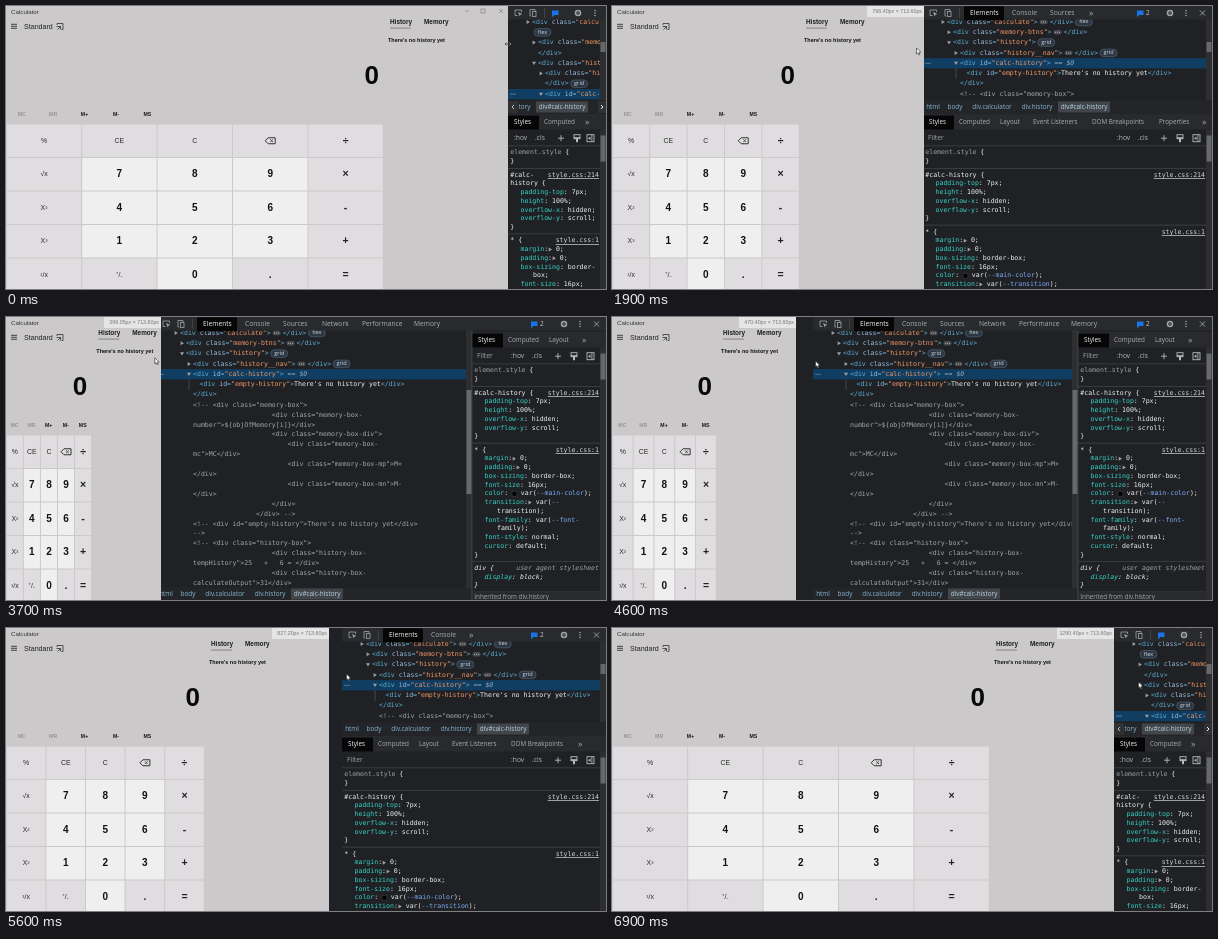
An HTML page with a canvas for the animation above (7000 ms loop, 600 by 283 pixels).

```html
<!DOCTYPE html>
<html lang="en">
<head>
<meta charset="utf-8">
<style>
html, body { margin: 0; width: 600px; height: 283px; overflow: hidden; background: #202124; }
canvas { display: block; width: 600px; height: 283px; }
</style>
</head>
<body>
<canvas id="stage"></canvas>
<script>
const canvas = document.getElementById('stage');
const ctx = canvas.getContext('2d');
const ratio = window.devicePixelRatio || 1;
const WIDTH = 600, HEIGHT = 283, LOOP = 7000, STEP = 100;
canvas.width = WIDTH * ratio;
canvas.height = HEIGHT * ratio;

const ARIAL = '"Liberation Sans", Arial, sans-serif';
const UI = '"Open Sans", "Noto Sans", sans-serif';
const MONO = '6.55px "DejaVu Sans Mono", monospace';

// Motion: [ms, value] pairs
const dividerKeys = [[0, 502], [400, 502], [700, 465], [1100, 413], [1200, 400], [1800, 312], [1900, 311],
  [2800, 201], [2900, 201], [3400, 165], [3800, 145], [4100, 146], [4500, 184], [4600, 201],
  [5500, 323], [5600, 336], [6700, 502]];
const pointerOffset = [[0, -1], [1200, -2], [1900, -5], [2900, -3], [4600, 4], [5600, 6], [6600, 6], [6900, 26]];
const pointerY = [[0, 38], [1200, 46], [1900, 45], [2900, 41], [4600, 47], [5600, 49], [6900, 57]];
const viewportSize = [[140, 357.6], [184, 470.4], [201, 515.2], [312, 796.4], [323, 827.2], [413, 1053.4], [502, 1290.4]];

function interpolate(keys, at) {
  if (at <= keys[0][0]) return keys[0][1];
  for (let i = 1; i < keys.length; i++) {
    const [a, from] = keys[i - 1], [b, to] = keys[i];
    if (at <= b) return from + (to - from) * (at - a) / (b - a);
  }
  return keys[keys.length - 1][1];
}

function rect(x, y, w, h, color) {
  ctx.fillStyle = color;
  ctx.fillRect(x, y, w, h);
}

function text(str, x, y, font, color, align = 'left') {
  ctx.font = font;
  ctx.fillStyle = color;
  ctx.textAlign = align;
  ctx.fillText(str, x, y);
  return ctx.measureText(str).width;
}

function trace(points, closed) {
  ctx.beginPath();
  points.forEach(([x, y]) => ctx.lineTo(x, y));
  if (closed) ctx.closePath();
}

function path(points, color, width = 0.7, closed = false) {
  trace(points, closed);
  ctx.strokeStyle = color;
  ctx.lineWidth = width;
  ctx.stroke();
}

function polygon(points, color) {
  trace(points, true);
  ctx.fillStyle = color;
  ctx.fill();
}

function box(x, y, w, h, color, width) {
  ctx.strokeStyle = color;
  ctx.lineWidth = width;
  ctx.strokeRect(x, y, w, h);
}

function circle(x, y, r, color, width) {
  ctx.beginPath();
  ctx.arc(x, y, r, 0, Math.PI * 2);
  if (width) {
    ctx.strokeStyle = color;
    ctx.lineWidth = width;
    ctx.stroke();
  } else {
    ctx.fillStyle = color;
    ctx.fill();
  }
}

function clipped(x, y, w, h, draw) {
  ctx.save();
  ctx.beginPath();
  ctx.rect(x, y, w, h);
  ctx.clip();
  draw();
  ctx.restore();
}

function triangle(x, y, open) {
  const shape = open ? [[-2, -1.4], [2, -1.4], [0, 1.9]] : [[-1.4, -2], [1.9, 0], [-1.4, 2]];
  polygon(shape.map(([dx, dy]) => [x + dx, y + dy]), '#9aa0a6');
}

function scrollbar(right, top, bottom, thumbTop, thumbBottom) {
  rect(right - 6, top, 6, bottom - top, '#2d2e30');
  rect(right - 5.5, thumbTop, 5, thumbBottom - thumbTop, '#66686a');
}

// Calculator page
const buttons = [
  ['%', 'CE', 'C', 'del', '÷'],
  ['√x', '7', '8', '9', '×'],
  ['X²', '4', '5', '6', '-'],
  ['X³', '1', '2', '3', '+'],
  ['¹/x', '⁺/₋', '0', '.', '=']
];

function drawButton(label, x, y, w, h) {
  const digit = /^\d$/.test(label);
  rect(x + 0.5, y + 0.5, w - 1, h - 1, digit ? '#f0eff0' : '#dfdddf');
  const cx = x + w / 2, cy = y + h / 2;
  if (label === 'del') {
    path([[cx - 5, cy], [cx - 2, cy - 3], [cx + 5, cy - 3], [cx + 5, cy + 3], [cx - 2, cy + 3]], '#222', 0.9, true);
    path([[cx, cy - 1.4], [cx + 2.8, cy + 1.4]], '#222');
    path([[cx, cy + 1.4], [cx + 2.8, cy - 1.4]], '#222');
  } else if (digit) {
    text(label, cx, cy + 0.3, 'bold 10px ' + ARIAL, '#111', 'center');
  } else if (/[÷×+=.-]/.test(label)) {
    text(label, cx, cy, 'bold 10.5px ' + ARIAL, '#222', 'center');
  } else {
    text(label, cx, cy + 0.2, '6.9px ' + ARIAL, '#2c2c2c', 'center');
  }
}

function drawPage(edge, dragging) {
  rect(0, 0, edge, HEIGHT, '#cbc9ca');
  const width = edge - Math.min(125, 15 + edge * 0.353);
  text('Calculator', 5, 6.3, '6.2px ' + ARIAL, '#333');
  for (const y of [18.3, 20.3, 22.3]) path([[5, y], [11, y]], '#222', 0.8);
  text('Standard', 18, 20.7, '7.1px ' + ARIAL, '#222');
  path([[51, 19], [51, 17.5], [57, 17.5], [57, 23.5], [55.5, 23.5]], '#333', 0.8);
  path([[50.5, 20.5], [54.5, 20.5], [54.5, 23.5]], '#333', 0.8);
  path([[54.5, 20.5], [51.5, 23.5]], '#333', 0.8);

  const tabFont = 'bold 6.4px ' + ARIAL;
  text('History', width + 7, 16, tabFont, '#1c1c1c');
  rect(width + 7, 21.7, 21, 0.7, '#666');
  text('Memory', width + 41, 16, tabFont, '#1c1c1c');
  text("There's no history yet", width + 5, 34.7, 'bold 5.5px ' + ARIAL, '#111');
  text('0', width - 4, 70.5, 'bold 26px ' + ARIAL, '#080808', 'right');

  const memoryCell = Math.min(31.4, width / 5);
  ['MC', 'MR', 'M+', 'M-', 'MS'].forEach((label, i) =>
    text(label, memoryCell * (i + 0.5), 108.2, 'bold 5.2px ' + ARIAL, i < 2 ? '#969596' : '#181818', 'center'));

  const cell = width / 5;
  buttons.forEach((row, r) => row.forEach((label, c) =>
    drawButton(label, c * cell + 0.3, 118 + r * 33.5, cell, 33.5)));

  if (dragging) {
    rect(edge - 57, 0, 57, 11, '#e6e5e6');
    const size = interpolate(viewportSize, edge).toFixed(2);
    text(size + 'px × 713.60px', edge - 2, 5.5, '5.3px ' + ARIAL, '#777', 'right');
  } else {
    path([[459, 5], [463, 5]], '#777', 0.6);
    box(475, 3, 4, 4, '#777', 0.6);
    path([[493, 3], [497, 7]], '#777', 0.6);
    path([[497, 3], [493, 7]], '#777', 0.6);
  }
}

// Element tree: [indent, arrow, pieces, selected]; ^ may wrap, # is a badge
const DOTS = '⋯';
const tree = [
  [24, '>', ['<div class="calculate">', DOTS, '</div>', '^#flex']],
  [30, '>', ['<div class="memory-btns">', DOTS, '^</div>']],
  [30, 'v', ['<div class="history">', '#grid']],
  [37, '>', ['<div class="history__nav">', DOTS, '^</div>', '#grid']],
  [37, 'v', ['<div id="calc-history">', ' == $0'], true],
  [43.5, '', ['<div id="empty-history">There\'s no ', '^history yet</div>']],
  [37, '', ['</div>']]
];
const comments = [
  [0, '<!-- <div class="memory-box">'], [20, '<div class="memory-box-'],
  [0, 'number">${objOfMemory[i]}</div>'], [20, '<div class="memory-box-div">'],
  [24, '<div class="memory-box-'], [0, 'mc">MC</div>'],
  [24, '<div class="memory-box-mp">M+'], [0, '</div>'],
  [24, '<div class="memory-box-mn">M-'], [0, '</div>'],
  [20, '</div>'], [16, '</div> -->'],
  [0, '<!-- <div id="empty-history">There\'s no history yet</div>'], [0, '-->'],
  [0, '<!-- <div class="history-box">'], [20, '<div class="history-box-'],
  [0, 'tempHistory">25   +   6 = </div>'], [20, '<div class="history-box-'],
  [0, 'calculateOutput">31</div>']
];

function drawMarkup(str, x, y) {
  const tokens = str.match(/<\/?div|"[^"]*"|[=>]|[^<>"=]+/g);
  tokens.forEach((token, i) => {
    let color = '#eef0f2';
    if (/^[<>=]/.test(token)) color = '#5db0d7';
    else if (token[0] === '"') color = '#f29766';
    else if (tokens[i + 1] === '=') color = '#9bbbdc';
    x += text(token, x, y, MONO, color);
  });
  return x;
}

function drawBadge(label, x, y) {
  ctx.beginPath();
  ctx.roundRect(x, y - 3.8, 17, 7.6, 3.8);
  ctx.fillStyle = '#2b3745';
  ctx.fill();
  ctx.strokeStyle = '#596979';
  ctx.lineWidth = 0.6;
  ctx.stroke();
  text(label, x + 8.5, y, '5.6px ' + UI, '#d5d8dc', 'center');
}

function drawPiece(piece, x, y) {
  if (piece === DOTS) {
    ctx.beginPath();
    ctx.roundRect(x + 2, y - 2.2, 8, 4.4, 2);
    ctx.fillStyle = '#4a4c50';
    ctx.fill();
    for (let i = 0; i < 3; i++) circle(x + 4 + i * 2, y, 0.5, '#c4c7ca');
    return x + 12;
  }
  if (piece[0] === '#') {
    drawBadge(piece.slice(1), x + 2, y);
    return x + 21;
  }
  if (piece.includes('$0')) return x + text(piece, x, y, 'italic ' + MONO, '#9aa8b8');
  return drawMarkup(piece, x, y);
}

function drawTree(left, right, bottom, thumbTop, thumbBottom) {
  const rowHeight = 10.3, commentHeight = 9.9;
  clipped(left, 13, right - left, bottom - 13, () => {
    let y = 16;
    for (const [indent, arrow, pieces, selected] of tree) {
      const start = left + indent;
      if (selected) {
        rect(left, y - 5.1, right - left, rowHeight, '#103e63');
        rect(start - 4.3, y + 5.2, 0.7, rowHeight, '#55585c');
        for (let i = 0; i < 3; i++) circle(left + 3 + i * 2, y, 0.55, '#aeb5bc');
      }
      if (arrow) triangle(start - 4, y, arrow === 'v');
      let x = start;
      for (const piece of pieces) {
        const wraps = piece[0] === '^', body = wraps ? piece.slice(1) : piece;
        ctx.font = MONO;
        const width = body[0] === '#' ? 21 : ctx.measureText(body).width;
        if (wraps && x + width > right - 6) {
          x = start;
          y += rowHeight;
        }
        x = drawPiece(body, x, y);
      }
      y += rowHeight;
    }
    for (const [columns, str] of comments) {
      text(str, left + 37 + columns * 3.94, y, MONO, '#a3a6a9');
      y += commentHeight;
    }
    scrollbar(right, 13, bottom, thumbTop, thumbBottom);
  });
}

// Developer tools
const mainTabs = [['Elements', 47, 75], ['Console', 89, 115], ['Sources', 127, 155], ['Network', 166, 193],
  ['Performance', 206, 246], ['Memory', 258, 285]];
const styleTabs = [['Styles', 6, 25], ['Computed', 36, 68], ['Layout', 77, 99], ['Event Listeners', 110, 157],
  ['DOM Breakpoints', 169, 225], ['Properties', 236, 266], ['Accessibility', 279, 316]];
const crumbs = [['html', 10], ['body', 32], ['div.calculator', 69], ['div.history', 114], ['div#calc-history', 161]];
const ICON = '#a0a5aa';

function drawTabs(tabs, left, y, limit, size) {
  let end = 0;
  for (const [label, from, to] of tabs) {
    if (to > limit) {
      if (end) text('»', left + from, y, '9px ' + UI, ICON);
      break;
    }
    if (!end) rect(left + from - 6, y - 7, to - from + 12, 14, '#060606');
    text(label, left + from, y, size + 'px ' + UI, end ? '#a9aeb3' : '#f1f3f4');
    end = to;
  }
}

function drawToolbar(left) {
  const width = WIDTH - left, narrow = width < 130;
  rect(left, 0, width, 13.5, '#292a2d');
  const x = left + 7;
  path([[x + 2.5, 9.5], [x, 9.5], [x, 4], [x + 6.5, 4], [x + 6.5, 6]], ICON, 0.8);
  polygon([[x + 3, 6], [x + 7.5, 8], [x + 5.5, 8.6], [x + 4.8, 10.6]], ICON);
  path([[x + 16, 10], [x + 15, 10], [x + 15, 3.5], [x + 20, 3.5], [x + 20, 5]], ICON, 0.8);
  box(x + 17.5, 5.5, 3.5, 5, ICON, 0.8);
  rect(left + 36, 2, 0.6, 10, '#505357');
  drawTabs(mainTabs, left, 7.3, width - 111, 6.7);
  const chat = narrow ? 549 : 528, gear = narrow ? 572 : 558, menu = narrow ? 589 : 574;
  rect(chat - 3, 4.5, 6.5, 4.5, '#1a73e8');
  rect(chat - 3, 9, 1.8, 1.5, '#1a73e8');
  if (!narrow) text('2', 534, 7.3, '6.5px ' + UI, '#c4c8cc');
  circle(gear, 7, 2.5, ICON, 1.5);
  circle(gear, 7, 0.7, ICON);
  for (const y of [4.5, 7, 9.5]) circle(menu, y, 0.8, ICON);
  if (!narrow) {
    path([[588, 4.5], [593, 9.5]], ICON, 0.9);
    path([[593, 4.5], [588, 9.5]], ICON, 0.9);
  }
}

function drawCrumbs(left, right, y) {
  const width = right - left, shift = Math.min(0, width - 205);
  clipped(left, y - 6.5, width, 13, () => {
    rect(left, y - 6.5, width, 13, '#242528');
    crumbs.forEach(([label, center], i) => {
      const x = left + center + shift;
      if (i === 4) rect(x - 26, y - 5.5, 52, 11, '#42464a');
      text(label, x, y + 0.2, '6.4px ' + UI, i === 4 ? '#b9d6e6' : '#86b8d6', 'center');
    });
    if (shift < 0) {
      rect(left, y - 6, 10, 12, '#303134');
      rect(right - 8, y - 6, 8, 12, '#303134');
      path([[left + 6, y - 2], [left + 4, y], [left + 6, y + 2]], '#bbb', 1);
      path([[right - 5, y - 2], [right - 3, y], [right - 5, y + 2]], '#eee', 1);
    }
  });
}

// Style rules: [selector, origin, declarations]
const rules = [
  ['#calc-history', 'style.css:214',
    ['padding-top: 7px', 'height: 100%', 'overflow-x: hidden', 'overflow-y: scroll']],
  ['*', 'style.css:1',
    ['margin:▸ 0', 'padding:▸ 0', 'box-sizing: border-box', 'font-size: 16px', 'color: ■ var(--main-color)',
      'transition:▸ var(--transition)', 'font-family: var(--font-family)', 'font-style: normal', 'cursor: default']],
  ['div', 'user agent stylesheet', ['display: block']]
];
const RULE_STEP = 8.75;

function drawValue(str, x, y, font) {
  for (const part of str.split(/(▸|■|--[\w-]*)/)) {
    if (part === '▸') {
      triangle(x + 2, y, false);
      x += 3.9;
    } else if (part === '■') {
      rect(x, y - 2.4, 4.8, 4.8, '#000');
      box(x, y - 2.4, 4.8, 4.8, '#555', 0.4);
      x += 4.8;
    } else {
      x += text(part, x, y, font, part.startsWith('--') ? '#7cacf8' : '#eef0f2');
    }
  }
}

function drawDeclaration(line, left, y, width, font) {
  const colon = line.indexOf(':') + 1;
  const prop = line.slice(0, colon), value = line.slice(colon) + ';';
  let x = left + 12.5;
  ctx.font = font;
  const fits = 13 + ctx.measureText(prop + value).width <= width - 8;
  x += text(prop.slice(0, -1), x, y, font, '#35d4c7');
  x += text(':', x, y, font, '#eef0f2');
  if (fits) {
    drawValue(value, x, y, font);
    return y + RULE_STEP;
  }
  const cut = value.lastIndexOf('-') + 1;
  drawValue(value.slice(0, cut), x, y, font);
  text(value.slice(cut), left + 25, y + RULE_STEP, font, '#eef0f2');
  return y + RULE_STEP * 2;
}

function drawOrigin(label, y, linked) {
  const font = linked ? MONO : 'italic ' + MONO;
  const width = text(label, 593, y, font, linked ? '#d2d5d8' : '#9aa0a6', 'right');
  if (linked) rect(593 - width, y + 3.3, width, 0.7, '#d2d5d8');
}

function drawFilterBar(left, y, width) {
  const color = '#b5babf', x = width < 115 ? 3 : 0;
  if (!x) text('Filter', left + 5, y + 0.4, '6.7px ' + UI, '#9ea3a8');
  text(':hov', 505 + x, y, '6.7px ' + UI, color);
  text('.cls', 526 + x, y, '6.7px ' + UI, color);
  path([[549 + x, y], [555 + x, y]], color, 0.9);
  path([[552 + x, y - 3], [552 + x, y + 3]], color, 0.9);
  box(565 + x, y - 3.5, 6, 4, color, 0.9);
  rect(565 + x, y - 1, 6, 1.6, color);
  rect(567 + x, y + 0.5, 2, 3.5, color);
  box(581, y - 3.5, 7, 7, color, 0.9);
  rect(585.5, y - 3.5, 0.8, 7, color);
  polygon([[582, y], [584.5, y - 1.8], [584.5, y + 1.8]], color);
}

function drawStyles(left, top) {
  const width = WIDTH - left, narrow = width < 115;
  const line = y => rect(left, y, width, 0.7, '#45474a');
  clipped(left, top, width, HEIGHT - top, () => {
    rect(left, top, width, HEIGHT - top, '#202124');
    rect(left, top, width, 16, '#292a2d');
    drawTabs(styleTabs, left, top + 9, width - 15, 6.3);
    drawFilterBar(left, top + 24.7, width);
    line(top + 32);

    const x = left + 2.3;
    text('element.style', x, top + 38.7, MONO, '#9aa0a6');
    text('{', x + 55, top + 38.7, MONO, '#eef0f2');
    text('}', x, top + 48, MONO, '#eef0f2');
    line(top + 54.5);
    let y = top + 61.5;
    for (const [selector, origin, declarations] of rules) {
      const authored = origin.startsWith('style');
      const font = authored ? MONO : 'italic ' + MONO;
      drawOrigin(origin, y, authored);
      let head = selector + ' {';
      if (narrow && selector.includes('-')) {
        const cut = head.indexOf('-') + 1;
        text(head.slice(0, cut), x, y, font, '#eef0f2');
        head = head.slice(cut);
        y += RULE_STEP;
      }
      text(head, x, y, font, '#eef0f2');
      y += RULE_STEP;
      for (const declaration of declarations) y = drawDeclaration(declaration, left, y, width, font);
      text('}', x, y, font, '#eef0f2');
      line(y + 6);
      y += 13.2;
    }
    rect(left, y - 6.5, width, 11, '#292a2d');
    text('Inherited from div.history', x, y - 1, '6.3px ' + UI, '#a3a8ad');
    scrollbar(WIDTH, top + 16, HEIGHT, top + 22, top + 48);
  });
}

function drawTools(left, side) {
  rect(0, 0, WIDTH, HEIGHT, '#202124');
  if (side) {
    drawTree(left, 466, 271, 73, 177);
    drawCrumbs(left, 466, 277);
    drawStyles(466, 14.5);
    rect(465.5, 14, 0.8, HEIGHT, '#4a4c50');
  } else {
    drawTree(left, WIDTH, 94, 36, 46);
    drawCrumbs(left, WIDTH, 101);
    drawStyles(left, 107.5);
  }
  drawToolbar(left);
}

function drawPointer(x, y) {
  const arrow = [[0, 0], [0, 6], [1.4, 4.8], [2.4, 7], [3.4, 6.5], [2.5, 4.4], [4.3, 4.3]]
    .map(([dx, dy]) => [x + dx - 1.5, y + dy - 3]);
  polygon(arrow, '#fff');
  path(arrow, '#222', 0.6, true);
}

function drawResize(x, y) {
  path([[x - 3, y], [x + 3, y]], '#444', 0.8);
  path([[x - 1.5, y - 1.5], [x - 3, y], [x - 1.5, y + 1.5]], '#444', 0.8);
  path([[x + 1.5, y - 1.5], [x + 3, y], [x + 1.5, y + 1.5]], '#999', 0.8);
}

function render(time) {
  const t = Math.floor((time % LOOP) / STEP) * STEP;
  const left = interpolate(dividerKeys, t);
  // The page repaints one step after the tools panel
  const edge = interpolate(dividerKeys, t - STEP);
  const dragging = t >= 400;
  ctx.setTransform(ratio, 0, 0, ratio, 0, 0);
  ctx.textBaseline = 'middle';
  drawTools(left, WIDTH - edge >= 405);
  clipped(0, 0, edge, HEIGHT, () => drawPage(edge, dragging));
  const x = left + interpolate(pointerOffset, t), y = interpolate(pointerY, t);
  if (dragging) drawPointer(x, y);
  else drawResize(x + 1, y);
}

const began = performance.now();
function tick() {
  render(performance.now() - began);
  requestAnimationFrame(tick);
}
tick();
</script>
</body>
</html>
```
